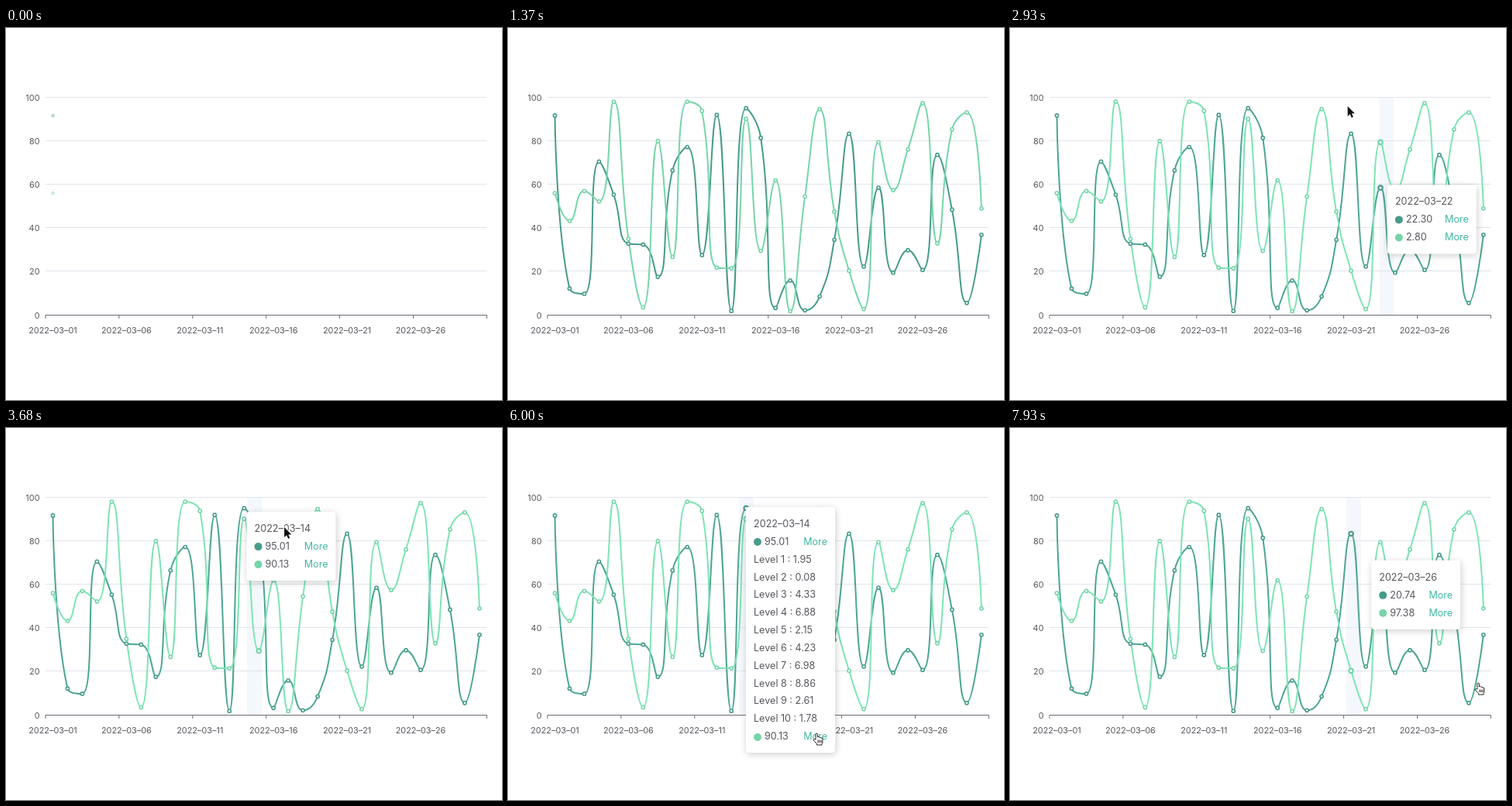
Recreate the animation shown at these times as an HTML page. Size 640x480 px, loop 8 s.

```html
<!DOCTYPE html>
<html lang="en">
<head>
<meta charset="utf-8">
<title>Line chart with tooltip</title>
<style>
html, body { margin: 0; width: 100%; height: 100%; overflow: hidden; background: #fff; }
body { position: relative; font-family: Inter, "Liberation Sans", sans-serif; }
svg { position: absolute; left: 0; top: 0; }
.labels { font-size: 10.9px; fill: #55575d; }
.grid { stroke: #e0e4ea; }
.axis { stroke: #6a6d75; }
.line { fill: none; stroke-width: 2; stroke-linejoin: bevel; }
.hover .line { filter: brightness(1.07); }
.dot { fill: #fff; stroke-width: 1.6; }
#tip {
  position: absolute; left: 0; top: 0; width: 115px; padding: 11px 10px 9px; box-sizing: border-box;
  border-radius: 4px; background: #fff; box-shadow: 1px 2px 10px rgba(0, 0, 0, .2);
  color: #55575d; font-size: 12.6px; line-height: 22.85px; white-space: nowrap;
}
.row { display: flex; align-items: center; }
.row i { width: 10px; height: 10px; border-radius: 50%; margin-right: 4px; }
.row b { margin-left: auto; font-weight: 400; color: #40b5a2; }
</style>
</head>
<body>
<svg id="chart" width="640" height="480" viewBox="0 0 640 480">
  <clipPath id="reveal"><rect id="clip" x="51" y="80" width="0" height="300"/></clipPath>
  <rect id="band" y="89" width="19" height="281" fill="#d2dbee" fill-opacity=".24"/>
  <g id="axes"></g>
  <g id="lines" clip-path="url(#reveal)"></g>
  <g id="dots"></g>
</svg>
<div id="tip"></div>
<svg width="640" height="480" viewBox="0 0 640 480">
  <path id="arrow" d="M0 0V13L3 10.2L5 14.8L7.2 13.9L5.2 9.4H9.2Z" fill="#111" stroke="#fff" stroke-width="1.6" paint-order="stroke"/>
  <path id="hand" d="M-1 8V1.2Q-1 0 .2 0T1.4 1.2V5Q1.5 4.2 2.7 4.4T4 5.4Q5.2 4.8 6 6Q7.6 5.6 8 7V10Q8 12 7 13.5V15H.5V13.5L-3.6 9Q-4 7.6 -2.6 7.4ZM2 8.5V12M4 8.5V12M6 8.5V12" fill="#fff" stroke="#222"/>
</svg>
<script>
const LOOP = 8000, LEFT = 51, STEP = 18.98, DAYS = 30, BASE = 370.5, UNIT = 2.81;
const ENTER = 1690, PIN = 3380, OPEN = 4240, LEAVE = 6450;
const $ = id => document.getElementById(id);
const clamp = (v, a = 0, b = 1) => Math.min(b, Math.max(a, v));
const px = i => LEFT + STEP * (i + .5);
const py = v => BASE - v * UNIT;

const series = [
  { color: '#479b8a', data: [91.65, 12.2, 9.8, 70.5, 55.3, 32.8, 32.4, 17.6, 66.5, 77.2, 27.6, 91.9, 1.9, 95.01, 81.4,
    3.3, 15.9, 2.2, 8.6, 34.59, 83.3, 22.3, 58.5, 19.5, 29.8, 20.74, 73.6, 48.4, 5.6, 36.9] },
  { color: '#76d5a8', data: [56.01, 43.3, 57, 52.2, 98, 35, 3.6, 79.9, 26.7, 98, 93.8, 21.8, 21.5, 90.13, 29.5,
    61.9, 1.8, 54.5, 94.6, 47.52, 20.4, 2.8, 79.4, 57.4, 76.1, 97.38, 33, 85.3, 93.1, 49] }
];
const levels = [1.95, .08, 4.33, 6.88, 2.15, 4.23, 6.98, 8.86, 2.61, 1.78];
const date = i => `2022–03–${String(i + 1).padStart(2, '0')}`;

function add(parent, tag, attrs, text) {
  const el = document.createElementNS('http://www.w3.org/2000/svg', tag);
  for (const k in attrs) el.setAttribute(k, attrs[k]);
  if (text !== undefined) el.textContent = text;
  return $(parent).appendChild(el);
}

// Smooth curve whose handles never leave the span of their segment.
function smooth(p) {
  const within = (c, a, b) => c.map((v, k) => clamp(v, Math.min(a[k], b[k]), Math.max(a[k], b[k])));
  const dist = (a, b) => Math.hypot(a[0] - b[0], a[1] - b[1]);
  let d = `M${p[0]}`, out = p[0];
  for (let i = 1; i < p.length; i++) {
    const a = p[i - 1], b = p[i], c = p[i + 1];
    let inner = b, next = b;
    if (c) {
      const l0 = dist(a, b), l1 = dist(b, c);
      next = within(b.map((v, k) => v + (c[k] - a[k]) * .5 * l1 / (l0 + l1)), b, c);
      inner = within(b.map((v, k) => v - (next[k] - v) * l0 / l1), a, b);
      next = b.map((v, k) => v + (v - inner[k]) * l1 / l0);
    }
    d += `C${out} ${inner} ${b}`;
    out = next;
  }
  return d;
}

for (let v = 0; v <= 100; v += 20) {
  const y = Math.round(py(v)) - .5;
  add('axes', 'path', { class: v ? 'grid' : 'axis', d: `M${LEFT} ${y}h${STEP * DAYS}` });
  add('axes', 'text', { class: 'labels', x: 43.5, y: y + 4, 'text-anchor': 'end' }, v);
}
for (let i = 0; i <= DAYS; i += 5) {
  add('axes', 'path', { class: 'axis', d: `M${LEFT + i * STEP} ${BASE}v4.5` });
  if (i < DAYS) add('axes', 'text', { class: 'labels', x: px(i), y: 393.8, 'text-anchor': 'middle' }, date(i));
}
const dots = [];
for (const { color, data } of series) {
  add('lines', 'path', { class: 'line', stroke: color, d: smooth(data.map((v, i) => [px(i), py(v)])) });
  data.forEach((v, i) => dots.push({ i, x: px(i), y: py(v), el: add('dots', 'circle', { class: 'dot', r: 2.1, stroke: color }) }));
}

// Turning points of the pointer: time, x, y.
const turns = [[1600, 3, 100], [2200, 332, 75], [2370, 456, 232], [2650, 520, 240], [3050, 400, 42], [3360, 325, 132],
  [3680, 359, 128], [4150, 398, 148], [4930, 390, 356], [5500, 398, 394], [6440, 398, 394], [6520, 110, 40],
  [6800, 69, 200], [6930, 67.5, 275], [7600, 410, 120], [7800, 464, 100], [7930, 604, 329]];

function cursor(t) {
  const n = turns.findIndex(k => k[0] > t);
  if (n < 1) return turns[n ? turns.length - 1 : 0].slice(1);
  const [t0, x0, y0] = turns[n - 1], [t1, x1, y1] = turns[n], f = (t - t0) / (t1 - t0);
  return [x0 + (x1 - x0) * f, y0 + (y1 - y0) * f];
}

// The chart keeps one hover point while the pointer is inside the tooltip.
const hover = t => t >= PIN && t < LEAVE ? [298.5, 82] : cursor(Math.max(t, ENTER));
const day = x => clamp(Math.floor((x - LEFT) / STEP), 0, DAYS - 1);

// Followers trail behind as the mean of their goal over the last span of time.
function trail(t, span, goal) {
  const n = 24;
  let sum = 0;
  for (let k = 0; k < n; k++) sum += goal(hover(t - span * (k + .5) / n));
  return sum / n;
}

function tipHtml(i, open) {
  const row = s => `<div class="row"><i style="background:${s.color}"></i>${s.data[i].toFixed(2)}<b>More</b></div>`;
  const list = open ? levels.map((v, n) => `<div>Level ${n + 1} : ${v.toFixed(2)}</div>`).join('') : '';
  return `<div>${date(i)}</div>${row(series[0])}${list}${row(series[1])}`;
}

const show = (el, on) => { el.style.visibility = on ? 'visible' : 'hidden'; };
let tipKey = '';

function draw(t) {
  const active = t >= ENTER, open = t >= OPEN && t < LEAVE;
  $('clip').setAttribute('width', clamp(t / 1000) * STEP * DAYS);
  $('lines').setAttribute('class', active ? 'hover' : '');

  const bandX = trail(t, 480, ([x]) => LEFT + STEP * day(x));
  const lit = active ? Math.round((bandX - LEFT) / STEP) : -1;
  show($('band'), active);
  $('band').setAttribute('x', bandX);

  for (const { i, x, y, el } of dots) {
    const k = clamp((t + 30 - i * 1000 / DAYS) / 45);
    el.setAttribute('transform', `translate(${x} ${y}) scale(${k * (i === lit ? 1.3 : 1)})`);
    el.setAttribute('opacity', k);
  }

  const i = day(hover(t - 58)[0]), key = `${i} ${open}`;
  if (key !== tipKey) $('tip').innerHTML = tipHtml(i, open);
  tipKey = key;
  const tipX = trail(t, 340, ([x]) => Math.min(x + 8.5, 505)), tipY = trail(t, 340, ([, y]) => y + 20);
  show($('tip'), active);
  $('tip').style.transform = `translate(${tipX}px, ${tipY}px)`;

  const [cx, cy] = cursor(t), move = `translate(${cx} ${cy})`;
  const hand = (t > 4020 && t < 4400) || (t > 5450 && t < LEAVE) || t > 7900;
  $('arrow').setAttribute('transform', move);
  $('hand').setAttribute('transform', move);
  show($('arrow'), t >= turns[0][0] && !hand);
  show($('hand'), hand);
}

const start = performance.now();
function frame() {
  draw((performance.now() - start) % LOOP);
  requestAnimationFrame(frame);
}
frame();
</script>
</body>
</html>
```
